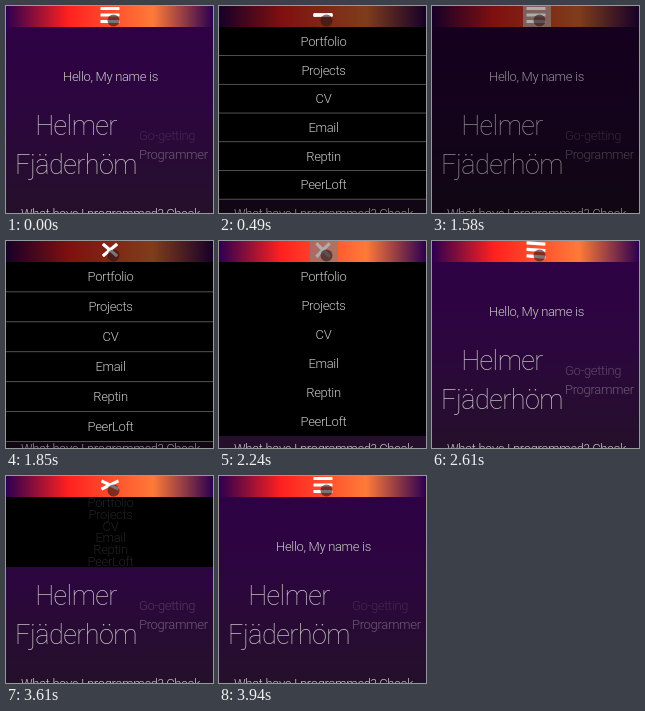
Animation of 207x207 px, one loop 4 s. Source, as an HTML page:

```html
<!DOCTYPE html>
<html lang="en">
<head>
<meta charset="utf-8">
<title>Menu toggle</title>
<style>
  html, body { margin: 0; width: 100%; height: 100%; overflow: hidden; background: #12031f; }
  svg { display: block; width: 100%; height: 100%; }
  text { font: 300 13px Roboto, "Open Sans", sans-serif; letter-spacing: -.025em; fill: #c8c8c8; }
  .big { font-weight: 100; font-size: 27px; letter-spacing: -.02em; }
  .mid { text-anchor: middle; }
</style>
</head>
<body>
<svg viewBox="0 0 207 207">
  <defs>
    <linearGradient id="sky" x2="0" y2="1">
      <stop stop-color="#2e0046"/>
      <stop offset=".5" stop-color="#2c063e"/>
      <stop offset="1" stop-color="#24102a"/>
    </linearGradient>
    <linearGradient id="sunset">
      <stop stop-color="#2c0050"/>
      <stop offset=".3" stop-color="#ff2020"/>
      <stop offset=".71" stop-color="#ff7a38"/>
      <stop offset="1" stop-color="#2c0050"/>
    </linearGradient>
  </defs>
  <rect width="207" height="207" fill="url(#sky)"/>
  <rect id="pageShade" width="207" height="207"/>
  <g id="page">
    <text class="mid" x="104.5" y="74.5">Hello, My name is</text>
    <text class="big mid" x="70" y="129">Helmer</text>
    <text class="big mid" x="70" y="168">Fjäderhöm</text>
    <text id="trait" x="133" y="134">Go-getting</text>
    <text x="133" y="153" opacity=".42">Programmer</text>
    <text class="mid" x="104.5" y="212">What have I programmed? Check</text>
  </g>
  <g id="menu">
    <rect id="panel" y="21" width="207"/>
  </g>
  <rect width="207" height="21" fill="url(#sunset)"/>
  <rect id="headerShade" width="207" height="21"/>
  <g id="icon" fill="#fff">
    <rect x="-9.5" y="-1.6" width="19" height="3.2" rx=".6"/>
    <rect x="-9.5" y="-1.6" width="19" height="3.2" rx=".6"/>
    <rect x="-9.5" y="-1.6" width="19" height="3.2" rx=".6"/>
  </g>
  <rect id="press" x="91" width="28" height="21" fill="#858080"/>
  <circle cx="107.5" cy="14.5" r="6" fill="#2a1418" opacity=".6"/>
</svg>
<script>
const LOOP = 4000;
const ROW = 29;
const LABELS = ["Portfolio", "Projects", "CV", "Email", "Reptin", "PeerLoft"];
// Taps alternate between opening and closing the menu.
const TAPS = [360, 950, 1620, 2260, 2960, 3560];

const $ = id => document.getElementById(id);
const set = (el, attrs) => {
  for (const name in attrs) el.setAttribute(name, attrs[name]);
};
const clamp = v => Math.max(0, Math.min(1, v));
const ramp = (t, from, to) => clamp((t - from) / (to - from));
const add = (tag, attrs) => {
  const el = document.createElementNS("http://www.w3.org/2000/svg", tag);
  set(el, attrs);
  $("menu").append(el);
  return el;
};

const rows = LABELS.map(label => {
  const text = add("text", { class: "mid", x: 104.5 });
  text.textContent = label;
  const line = add("rect", { width: 207, height: .8, fill: "#666" });
  return { text, line };
});
const bars = [...$("icon").children];

function readState(t) {
  let dim = 0, press = 0, open = 0, cross = 0, wobble = 0;
  TAPS.forEach((tap, i) => {
    const opening = i % 2 === 0;
    const fade = ramp(t, tap - 240, tap - 50);
    dim += opening ? fade : -fade;
    press += ramp(t, tap - 100, tap - 50) * (1 - ramp(t, tap, tap + 50));
    const age = t - tap;
    if (age < 0) return;
    const spring = Math.exp(-age / 70) * Math.cos(.0115 * age);
    open = opening ? 1 - spring : Math.max(0, spring);
    const turn = ramp(age, 0, 245);
    cross = opening ? turn : 1 - turn;
    wobble = opening ? 0 : Math.sin(Math.PI * ramp(age, 245, 380)) * 6;
  });
  return { dim, press, open, cross, wobble };
}

function drawIcon(cross, wobble) {
  const gap = 6.5 * (1 - clamp(cross * 2));
  const angle = 45 * clamp(cross * 2 - 1);
  bars.forEach((bar, i) => {
    const side = i - 1;
    set(bar, {
      transform: `translate(104 ${9 + side * gap}) rotate(${-side * angle + wobble})`,
      opacity: side ? 1 : 1 - ramp(cross, .5, .65)
    });
  });
}

function draw(t) {
  const { dim, press, open, cross, wobble } = readState(t);
  const shown = clamp(open);
  const row = ROW * open;

  set($("pageShade"), { opacity: dim * .55 });
  set($("headerShade"), { opacity: dim * .5 });
  set($("page"), { opacity: 1 - dim * .3 });
  set($("trait"), { opacity: .28 - .13 * Math.cos(t / LOOP * 4 * Math.PI) });

  set($("menu"), { visibility: open > .005 ? "visible" : "hidden" });
  set($("panel"), { height: row * LABELS.length });
  rows.forEach(({ text, line }, i) => {
    set(text, { y: 25.5 + row * (i + .5), opacity: ramp(shown, .3, .9) });
    set(line, { y: 20.5 + row * (i + 1), opacity: dim * shown });
  });

  drawIcon(cross, wobble);
  set($("press"), { opacity: press * .65 });
}

const start = performance.now();
function tick() {
  draw((performance.now() - start) % LOOP);
  requestAnimationFrame(tick);
}
tick();
</script>
</body>
</html>
```
